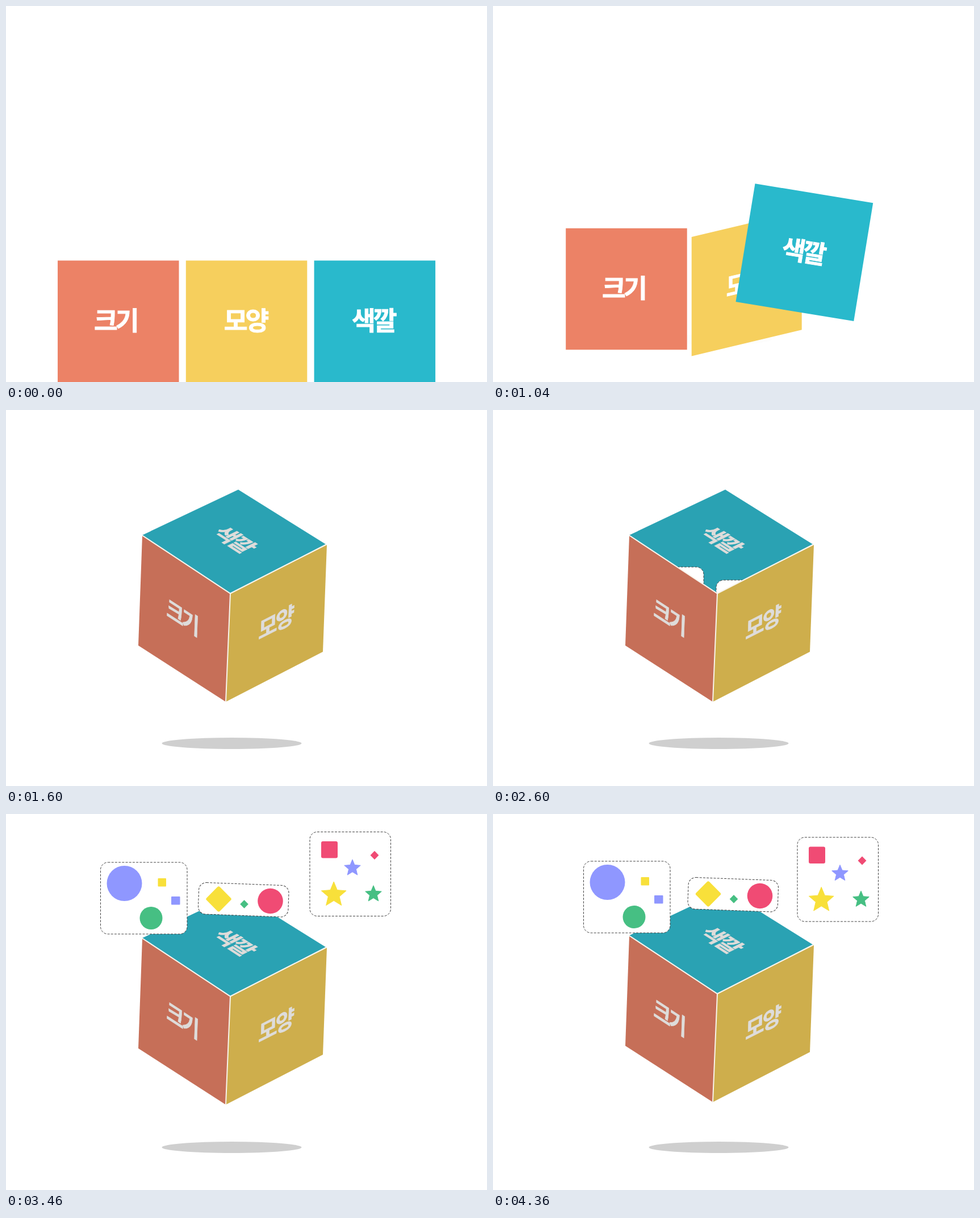
Write an HTML page that moves like this. It is 847 px wide and 661 px high and loops after 4.46 s.

```html
<!DOCTYPE html>
<html lang="ko">
<head>
<meta charset="utf-8">
<title>Cube</title>
<style>
html, body { margin: 0; width: 100%; height: 100%; overflow: hidden; background: #fff; }
svg { display: block; width: 100vw; height: 100vh; }
text { font: 900 45.5px "Noto Sans CJK KR", "Noto Sans KR", "Noto Sans CJK", "Noto Sans CJK JP", sans-serif; letter-spacing: -4px; text-anchor: middle; stroke-width: 0.9; }
.frame { fill: #fff; stroke: #444; stroke-width: 1; stroke-dasharray: 4 2.2; }
</style>
</head>
<body>
<svg id="stage" viewBox="0 0 847 661">
  <clipPath id="mouth"><path id="mouthPath" d="M0 -50H847V236H563L395 322.5L240 220H0Z"/></clipPath>
  <ellipse id="shadow" cy="586" ry="10"/>
  <g id="cube"></g>
  <g clip-path="url(#mouth)"><g id="cards"></g></g>
  <path id="seams" d="M240 220.5L395 322.5L564 236.5M395 322.5L387 513" fill="none" stroke="#f8f4ec" stroke-width="2"/>
</svg>
<script>
const LOOP = 4460, SIDE = 213.5, LAST = 11;
const PINK = '#f04b74', YELLOW = '#f8e03a', GREEN = '#46bf83', PURPLE = '#8f97ff';
const $ = id => document.getElementById(id);
const clamp = v => Math.max(0, Math.min(1, v));
const mix = (a, b, u) => a + (b - a) * u;
const mixAll = (a, b, u) => a.map((v, i) => mix(v, b[i], u));

function add(parent, tag, attrs) {
  const el = document.createElementNS('http://www.w3.org/2000/svg', tag);
  for (const k in attrs) el.setAttribute(k, attrs[k]);
  return parent.appendChild(el);
}

// Corners run clockwise from the top left of the label.
const square = (x, y) => [x, y, x + SIDE, y, x + SIDE, y + SIDE, x, y + SIDE];

const faces = [
  { label: '크기', dx: -5, from: [236, 130, 102], to: [198, 111, 88], shadeStart: 7,
    keys: [[0, square(91, 447.6)], [1, square(97, 435.3)], [6, square(149, 361)],
           [7, [161, 339, 368, 355, 368, 568, 161, 551]],
           [11, [240, 221, 395, 323, 387, 513, 233, 414]]] },
  { label: '모양', dx: -2, from: [246, 207, 93], to: [206, 174, 76], shadeStart: 4,
    keys: [[0, square(316.8, 447.6)], [1, square(318.4, 431.8)],
           [7, [381, 380, 555.5, 288, 555.5, 493, 381, 585.5]],
           [11, [395, 323, 565, 237, 558, 425, 387, 513]]] },
  { label: '색깔', dx: -2.5, from: [41, 185, 204], to: [42, 162, 179], shadeStart: 4,
    keys: [[0, square(542.6, 447.6)], [1, square(511, 426.5)],
           [7, [412, 198, 614, 266, 546, 468, 344, 400]],
           [10, [409, 126, 562, 222, 395, 308, 240, 205]],
           [11, [409, 140, 563, 236, 395, 322, 240, 220]]] }
];
for (const f of faces) {
  f.poly = add($('cube'), 'polygon', {});
  f.text = add($('cube'), 'text', { x: f.dx, y: 15.5 });
  f.text.textContent = f.label;
}

function corners(keys, step) {
  let i = 1;
  while (i < keys.length - 1 && step > keys[i][0]) i++;
  const [s0, p0] = keys[i - 1], [s1, p1] = keys[i];
  return mixAll(p0, p1, clamp((step - s0) / (s1 - s0)));
}

function drawFace(f, step) {
  const p = corners(f.keys, step);
  const shade = clamp((step - f.shadeStart) / (LAST - f.shadeStart));
  f.poly.setAttribute('points', p.join(' '));
  f.poly.setAttribute('fill', `rgb(${mixAll(f.from, f.to, shade)})`);
  const [ax, ay, bx, by, cx, cy, dx, dy] = p, w = 2 * SIDE;
  f.text.setAttribute('transform', `matrix(${[
    (bx - ax + cx - dx) / w, (by - ay + cy - dy) / w,
    (dx - ax + cx - bx) / w, (dy - ay + cy - by) / w,
    (ax + bx + cx + dx) / 4, (ay + by + cy + dy) / 4]})`);
  const ink = `rgb(${mixAll([255, 255, 255], [222, 220, 218], shade)})`;
  f.text.setAttribute('fill', ink);
  f.text.setAttribute('stroke', ink);
}

const card = () => add($('cards'), 'g', {});
const box = (g, x, y, w, h, fill, rx = 1) => add(g, 'rect', { x, y, width: w, height: h, rx, fill });
const disc = (g, cx, cy, r, fill) => add(g, 'circle', { cx, cy, r, fill });
const diamond = (g, x, y, side, fill, rx) =>
  box(g, x - side / 2, y - side / 2, side, side, fill, rx).setAttribute('transform', `rotate(45 ${x} ${y})`);
function star(g, x, y, r, fill) {
  const pts = Array.from({ length: 10 }, (_, i) => {
    const a = i * Math.PI / 5, q = i % 2 ? r * 0.45 : r;
    return [x + q * Math.sin(a), y - q * Math.cos(a)];
  });
  add(g, 'polygon', { points: pts.join(' '), fill, stroke: fill, 'stroke-linejoin': 'round' });
}
const outline = (g, x, y, width, height) =>
  add(g, 'rect', { x, y, width, height, rx: 13, class: 'frame' });

const left = card(), middle = card(), right = card();

outline(left, 166.5, 85, 152.5, 126);
disc(left, 208.5, 122, 31, PURPLE);
box(left, 267.5, 113, 14.5, 14.5, YELLOW);
box(left, 291, 145, 15.5, 14.5, PURPLE);
disc(left, 255.5, 183, 20, GREEN);

outline(middle, 332, 126.5, 158.5, 55.5).setAttribute('transform', 'rotate(2.1 411 154)');
diamond(middle, 367.5, 153, 33, YELLOW, 3);
diamond(middle, 412.5, 162, 10.5, GREEN, 0.5);
disc(middle, 458.5, 156.5, 22.3, PINK);

outline(right, 535, 31.5, 142.5, 148);
box(right, 555, 48, 29, 29.5, PINK, 3);
diamond(right, 649, 72.5, 10.7, PINK, 0.5);
star(right, 610, 95, 15, PURPLE);
star(right, 577.2, 142, 23, YELLOW);
star(right, 647, 140.8, 15, GREEN);

const move = (el, x, y) => el.setAttribute('transform', `translate(${x} ${y})`);

function draw(t) {
  const step = t < 800 ? 0 : Math.min(LAST, Math.floor((t - 800) / 80) + 1);
  const pop = clamp(Math.floor((t - 2600) / 80) / 6);
  const shaking = t >= 3160;
  const up = shaking && Math.floor((t - 3160) / 100) % 2 === 0;
  const lift = up ? -6.5 : -2 * pop;

  for (const f of faces) drawFace(f, step);
  for (const id of ['cube', 'seams', 'mouthPath']) move($(id), 0, lift);
  $('seams').setAttribute('opacity', step === LAST ? 1 : 0);

  const s = $('shadow');
  s.setAttribute('cx', 397.5 + (LAST - step) * 0.35);
  s.setAttribute('rx', 123 - (LAST - step) * 4.5);
  s.setAttribute('opacity', 0.19 * clamp((step - 3.7) / 7.3));

  // Cards rise out of the box, then rattle between two poses.
  $('cards').setAttribute('visibility', t >= 2600 ? 'visible' : 'hidden');
  const rest = 1 - pop;
  if (up) {
    move(left, -7, -2);
    move(middle, 11.5, -12.5);
    move(right, 1, 9.5);
  } else {
    move(left, 52 * rest, 191 * rest);
    move(middle, shaking ? 7 : -14 * rest, shaking ? -3.5 : 205 * rest);
    move(right, -142 * rest, 267.5 * rest);
  }
}

const start = performance.now();
function tick() {
  draw((performance.now() - start) % LOOP);
  requestAnimationFrame(tick);
}
tick();
</script>
</body>
</html>
```
